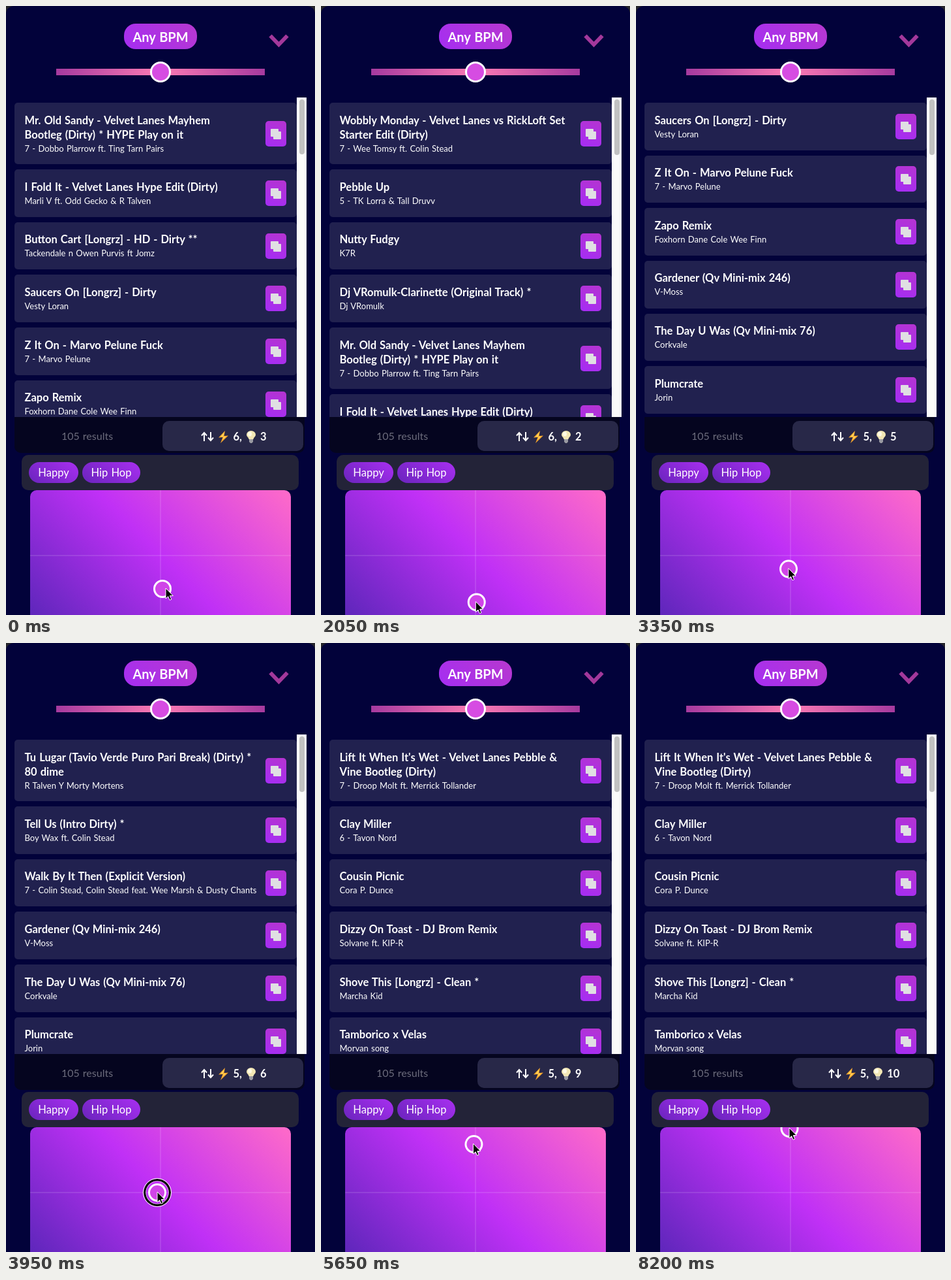
Recreate the animation shown at these times as an HTML page. Size 474x932 px, loop 8.25 s.

```html
<!DOCTYPE html>
<html lang="en">
<head>
<meta charset="utf-8">
<title>Song finder</title>
<style>
html, body { margin: 0; width: 100%; height: 100%; overflow: hidden; background: #25252b; }
body { position: relative; color: #fff; font: 16.5px Lato, "Open Sans", sans-serif; word-spacing: 1px; white-space: nowrap; }
div, svg { position: absolute; box-sizing: border-box; }
#app { inset: 0; border-radius: 12px 12px 0 0; background: #02023a; overflow: hidden; }
.pill { display: flex; align-items: center; justify-content: center; border-radius: 18px; }
#bpm { left: 181px; top: 27px; width: 112px; height: 39px; font-size: 20px; font-weight: 700; background: linear-gradient(45deg, #a52ef2, #b738cf); }
#track { left: 77px; top: 96px; width: 320px; height: 10px; background: linear-gradient(90deg, #a63a9f, #fb7bb4 50%, #a63a9f); }
#thumb { left: 221px; top: 85px; width: 32px; height: 32px; border: 3px solid #fff; border-radius: 50%; background: #d64ce2; }
#list { left: 13px; top: 140px; width: 433px; height: 489px; padding-top: 8px; overflow: hidden; }
.card { position: relative; height: 72.65px; margin-bottom: 8px; padding: 15.5px 15.5px 0; border-radius: 5px; background: #21214f; line-height: 22px; }
.card.tall { height: 94.2px; }
.card small { display: block; margin-top: 1px; font-size: 13px; line-height: 18.6px; }
.card b { display: block; }
.copy { right: 16px; top: calc(50% - 19.5px); width: 32px; height: 39px; border-radius: 5px; background: linear-gradient(20deg, #a52df5, #b534d0); }
.copy::before, .copy::after { content: ""; position: absolute; left: 8px; top: 12px; width: 12px; height: 12px; border-radius: 1px; background: #e0dfe3; }
.copy::after { left: 12px; top: 16px; }
#bar { left: 446px; top: 140px; width: 15px; height: 489px; background: #fafafa; }
#grip { left: 4px; top: 3px; width: 8px; height: 85px; border-radius: 4px; background: #c1c1c1; }
#foot { left: 13px; top: 629px; width: 445px; height: 55px; border-radius: 0 0 10px 10px; background: #05051f; }
#count { left: 13px; top: 629px; width: 223px; height: 57px; color: #6c6c7c; font-size: 16px; }
#sort { left: 240px; top: 635px; width: 216px; height: 46px; border-radius: 10px; background: #282848; font-weight: 700; padding: 2px 0 0 3px; }
#sort svg { position: static; margin-right: 6px; }
#sort span { margin-right: 6px; }
#sort span:last-child { margin: 0; }
#tags { left: 24px; top: 687px; width: 425px; height: 54px; border-radius: 10px; background: #232338; }
.tag { top: 11px; height: 32px; border-radius: 16px; background: linear-gradient(35deg, #6a24bd, #a82ff0); }
#pad { left: 37px; top: 741px; width: 400px; height: 200px; border-radius: 10px 10px 0 0; overflow: hidden; background: linear-gradient(45deg, #5b26b9, #c030f6 50%, #ff6bc8); }
#pad i { position: absolute; background: #ffffff1c; }
#ball { left: -14px; top: -14px; width: 28px; height: 28px; border: 3px solid #fff; border-radius: 50%; background: #d044e8; }
#ring { left: -22px; top: -22px; width: 44px; height: 44px; border-radius: 50%; border: 1.5px solid #fff; box-shadow: inset 0 0 0 3.2px #000, inset 0 0 0 4px #ffffffb0; }
#cursor { left: 0; top: 0; overflow: visible; }
</style>
</head>
<body>
<div id="app">
  <div id="bpm" class="pill">Any BPM</div>
  <svg width="474" height="70"><path d="M405.500 45.500L418.500 59L431.500 45.500" fill="none" stroke="#a3389b" stroke-width="6"/></svg>
  <div id="track"></div><div id="thumb"></div>
  <div id="list"></div>
  <div id="bar"><div id="grip"></div></div>
  <div id="foot"></div>
  <div id="count" class="pill">105 results</div>
  <div id="sort" class="pill">
    <svg width="20" height="16" fill="none" stroke="#fff" stroke-width="2"><path d="M5 15V3M1 6.500L5 2L9 6.500M15 1V13M11 9.500L15 14L19 9.500"/></svg>
    <svg width="17" height="19"><path d="M11 0L1 10.500L7.500 10L4 19L16 7.500L9.500 8Z" fill="#f9a52b"/><path d="M10 2L4 9.500L9 9L7 14L13 8.500L8 9Z" fill="#ffd45a"/></svg>
    <span id="energy"></span>
    <svg width="16" height="19"><path d="M4.500 13C4 10 1 9 1 6A7 6 0 0 1 15 6C15 9 12 10 11.500 13Z" fill="#f3e7b4"/><ellipse cx="6" cy="5" rx="3" ry="3.500" fill="#fffbe6"/><path d="M5 13H11V17L9 19H7L5 17Z" fill="#9a9aa2"/></svg>
    <span id="mood"></span>
  </div>
  <div id="tags">
    <div class="pill tag" style="left:11px;width:76px">Happy</div>
    <div class="pill tag" style="left:93px;width:89px">Hip Hop</div>
  </div>
  <div id="pad">
    <i style="left:199px;width:2px;height:100%"></i><i style="top:99px;height:2px;width:100%"></i>
    <div id="ball"></div>
  </div>
  <div id="ring"></div>
  <svg id="cursor" width="12" height="20"><path d="M0 0V16L3.700 12.600L6.100 18.200L8.700 17.100L6.300 11.600H11.300Z" stroke="#fff"/></svg>
</div>
<script>
const $ = id => document.getElementById(id);

// key: title | artist, "/" breaks the title
const songs = {
  sandy: "Mr. Old Sandy - Velvet Lanes Mayhem/Bootleg (Dirty) * HYPE Play on it|7 - Dobbo Plarrow ft. Ting Tarn Pairs",
  fold: "I Fold It - Velvet Lanes Hype Edit (Dirty)|Marli V ft. Odd Gecko &amp; R Talven",
  cart: "Button Cart [Longrz] - HD - Dirty **|Tackendale n Owen Purvis ft Jomz",
  saucers: "Saucers On [Longrz] - Dirty|Vesty Loran",
  zit: "Z It On - Marvo Pelune Fuck|7 - Marvo Pelune",
  zapo: "Zapo Remix|Foxhorn Dane Cole Wee Finn",
  monday: "Wobbly Monday - Velvet Lanes vs RickLoft Set/Starter Edit (Dirty)|7 - Wee Tomsy ft. Colin Stead",
  pebble: "Pebble Up|5 - TK Lorra &amp; Tall Druvv",
  fudgy: "Nutty Fudgy|K7R",
  clarinet: "Dj VRomulk-Clarinette (Original Track) *|Dj VRomulk",
  lugar: "Tu Lugar (Tavio Verde Puro Pari Break) (Dirty) */80 dime|R Talven Y Morty Mortens",
  tell: "Tell Us (Intro Dirty) *|Boy Wax ft. Colin Stead",
  walk: "Walk By It Then (Explicit Version)|7 - Colin Stead, Colin Stead feat. Wee Marsh &amp; Dusty Chants",
  gardener: "Gardener (Qv Mini-mix 246)|V-Moss",
  day: "The Day U Was (Qv Mini-mix 76)|Corkvale",
  plum: "Plumcrate|Jorin",
  clay: "Clay Miller|6 - Tavon Nord",
  picnic: "Cousin Picnic|Cora P. Dunce",
  lift: "Lift It When It's Wet - Velvet Lanes Pebble &amp;/Vine Bootleg (Dirty)|7 - Droop Molt ft. Merrick Tollander",
  dizzy: "Dizzy On Toast - DJ Brom Remix|Solvane ft. KIP-R",
  shove: "Shove This [Longrz] - Clean *|Marcha Kid",
  tambo: "Tamborico x Velas|Morvan song"
};

// lists by the highest mood value they serve
const lists = [
  [2, "monday pebble fudgy clarinet sandy fold"],
  [3, "sandy fold cart saucers zit zapo"],
  [5, "saucers zit zapo gardener day plum"],
  [6, "lugar tell walk gardener day plum"],
  [7, "clay picnic lugar tell walk gardener"],
  [10, "lift clay picnic dizzy shove tambo"]
];

// time, ball x, ball y, cursor x, focus ring until the next key
const keys = [
  [0, 240, 892, 245, 0],
  [800, 240, 927, 238, 0],
  [1750, 240, 927, 238, 0],
  [2500, 236.4, 885.7, 236, 1],
  [2850, 236.4, 885.7, 236, 0],
  [3800, 232, 841, 232, 1],
  [4200, 232, 841, 232, 0],
  [4900, 236, 798, 235, 1],
  [5200, 236, 798, 235, 0],
  [5850, 234, 758, 233, 1],
  [7300, 234, 758, 233, 0],
  [8100, 235.5, 743, 235, 0],
  [8250, 235.5, 743, 235, 0]
];

function card(id) {
  const [title, artist] = songs[id].split("|");
  const tall = title.includes("/") ? " tall" : "";
  return `<div class="card${tall}"><b>${title.replace("/", "<br>")}</b><small>${artist}</small><div class="copy"></div></div>`;
}

const move = (el, x, y) => el.style.transform = `translate(${x}px, ${y}px)`;
let shown;

function draw(now) {
  const t = Math.floor(now % 8250 / 50) * 50;
  const i = keys.findIndex(k => k[0] > t) - 1;
  const a = keys[i], b = keys[i + 1];
  const u = (t - a[0]) / (b[0] - a[0]), e = u * u * (3 - 2 * u);
  const [, x, y, cx] = a.map((v, n) => v + (b[n] - v) * e);

  move($("ball"), x - 37, y - 741);
  move($("ring"), x, y);
  move($("cursor"), cx, y - 1);
  $("ring").style.visibility = a[4] ? "visible" : "hidden";

  const mood = Math.round(1 + (941 - y) / 200 * 9);
  $("energy").textContent = Math.round(1 + (x - 37) / 400 * 9) + ",";
  $("mood").textContent = mood;
  const ids = lists.find(l => mood <= l[0])[1];
  if (ids !== shown) {
    shown = ids;
    $("list").innerHTML = ids.split(" ").map(card).join("");
    $("grip").style.height = mood === 3 ? "84px" : "85px";
  }
}

const start = performance.now();
function loop() {
  draw(performance.now() - start);
  requestAnimationFrame(loop);
}
loop();
</script>
</body>
</html>
```
